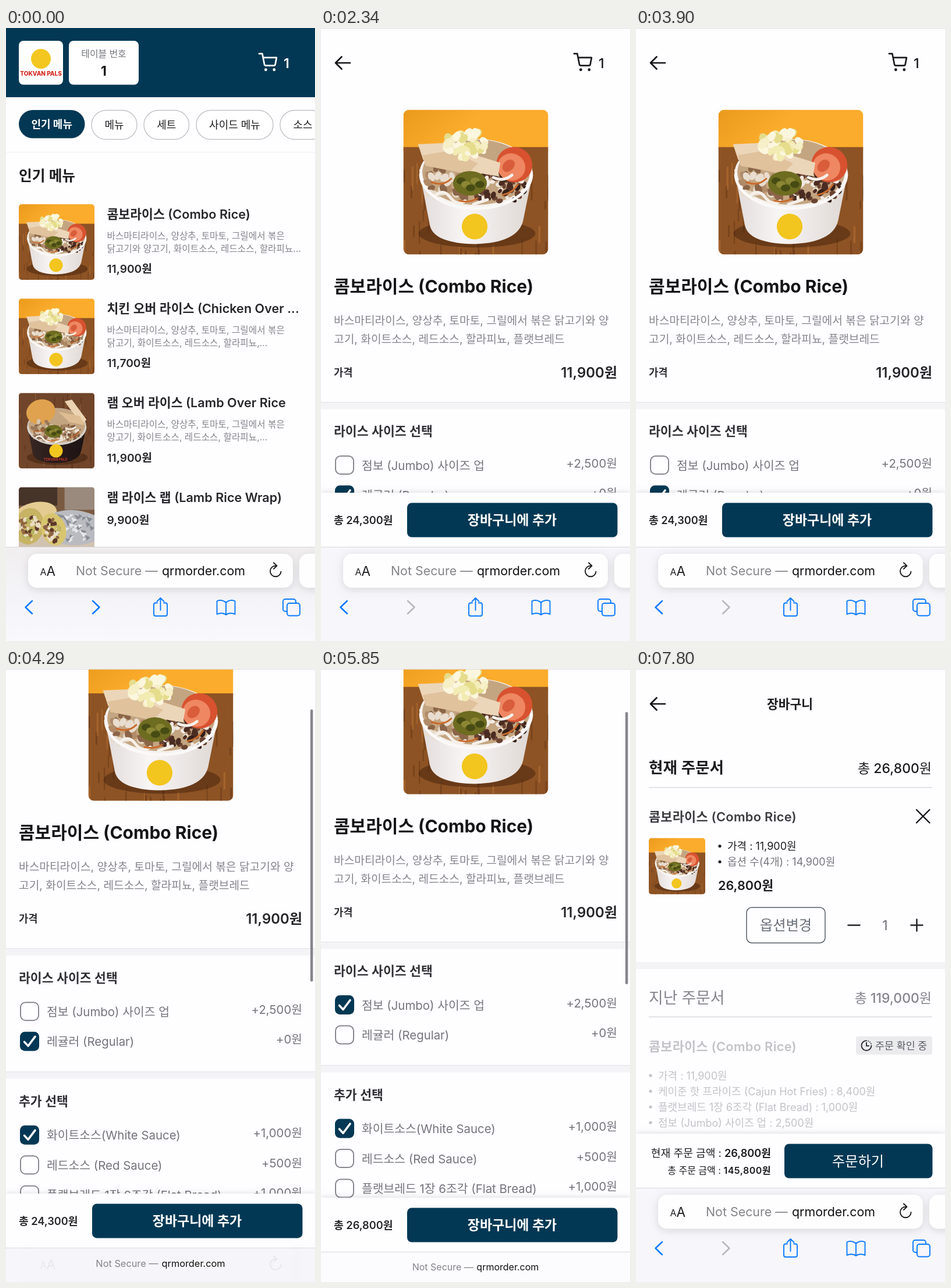
Animation of 531x1054 px, one loop 7930 ms. Source, as an HTML page with a canvas:

```html
<!DOCTYPE html>
<html lang="ko">
<head>
<meta charset="utf-8">
<title>Table order</title>
<style>
html, body { margin: 0; width: 100%; height: 100%; overflow: hidden; background: #fefdff; }
canvas { display: block; width: 531px; height: 1054px; }
</style>
</head>
<body>
<canvas id="stage"></canvas>
<script>
const W = 531, H = 1054, LOOP = 7930, STEP = 130;
const NAVY = '#023854', PAGE = '#fefdff', INK = '#1d1d20', GREY = '#85858d', PALE = '#c3c3c8', BLUE = '#0a7aff';
const FAMILY = 'Inter, "Noto Sans CJK KR", "Noto Sans CJK", sans-serif';
const BRAND = 'TOKVAN PALS';
const canvas = document.getElementById('stage');
const ctx = canvas.getContext('2d');
const dpr = window.devicePixelRatio || 1;
canvas.width = W * dpr;
canvas.height = H * dpr;

const clamp = v => Math.max(0, Math.min(1, v));
const lerp = (a, b, p) => a + (b - a) * p;
const easeOut = p => 1 - Math.pow(1 - p, 3);

function seeded(n) {
  return () => (n = (n * 16807) % 2147483647) / 2147483647;
}

// cy is the optical middle of the line
function text(str, x, cy, size, weight, color, align = 'left', spacing = 0) {
  ctx.font = `${weight} ${size}px ${FAMILY}`;
  ctx.letterSpacing = spacing + 'px';
  ctx.textAlign = align;
  ctx.fillStyle = color;
  ctx.fillText(str, x, cy + size * 0.37);
  return ctx.measureText(str).width;
}

function rect(x, y, w, h, color) {
  ctx.fillStyle = color;
  ctx.fillRect(x, y, w, h);
}

function box(x, y, w, h, r, fill, line, width = 1.4) {
  ctx.beginPath();
  ctx.roundRect(x, y, w, h, r);
  if (fill) { ctx.fillStyle = fill; ctx.fill(); }
  if (line) { ctx.strokeStyle = line; ctx.lineWidth = width; ctx.stroke(); }
}

function disc(x, y, rx, color, ry = rx, turn = 0) {
  ctx.beginPath();
  ctx.ellipse(x, y, rx, ry, turn, 0, Math.PI * 2);
  ctx.fillStyle = color;
  ctx.fill();
}

function shape(d, color) {
  ctx.fillStyle = color;
  ctx.fill(new Path2D(d));
}

function line(d, color, width, cap = 'round') {
  ctx.strokeStyle = color;
  ctx.lineWidth = width;
  ctx.lineCap = cap;
  ctx.lineJoin = 'round';
  ctx.stroke(new Path2D(d));
}

function shadowed(color, blur, dy, draw) {
  ctx.save();
  ctx.shadowColor = color;
  ctx.shadowBlur = blur * dpr;
  ctx.shadowOffsetY = dy * dpr;
  draw();
  ctx.restore();
}

/* ---------- photos, drawn in a 248 unit square ---------- */

function scatter(rnd, n, cx, cy, rx, ry, size, colors) {
  for (let i = 0; i < n; i++) {
    const a = rnd() * Math.PI * 2, d = Math.sqrt(rnd());
    const r = size * (0.5 + rnd() * 0.6);
    disc(cx + Math.cos(a) * d * rx, cy + Math.sin(a) * d * ry, r,
      colors[Math.floor(rnd() * colors.length)], r * 0.7, rnd() * 3);
  }
}

function wood(rnd, top, color) {
  rect(0, top, 248, 248 - top, color);
  for (let i = 0; i < 70; i++) {
    const x = rnd() * 248, y = top + rnd() * (248 - top);
    rect(x, y, 1.5 + rnd() * 2, 12 + rnd() * 36, i % 3 ? 'rgba(62,28,8,.28)' : 'rgba(214,140,66,.3)');
  }
}

function bowl(kind) {
  const rnd = seeded(kind === 'lamb' ? 91 : 37);
  const lamb = kind === 'lamb', combo = kind === 'combo';
  if (lamb) {
    wood(rnd, 0, '#70452a');
  } else {
    const g = ctx.createLinearGradient(0, 0, 60, 70);
    g.addColorStop(0, '#eb9a1c');
    g.addColorStop(1, '#fbac2c');
    rect(0, 0, 248, 70, g);
    wood(rnd, 64, '#8d5324');
  }
  disc(126, 212, 100, 'rgba(50,22,6,.4)', 24);
  const body = ctx.createLinearGradient(28, 0, 220, 0);
  body.addColorStop(0, lamb ? '#3a2825' : '#e2dcda');
  body.addColorStop(0.4, lamb ? '#2a1c1b' : '#f8f5f5');
  body.addColorStop(1, lamb ? '#1d1313' : '#dfd8d4');
  shape('M27 102 L45 196 Q50 229 123 230 Q196 228 205 190 L222 106 Z', body);
  disc(124.5, 110, 97, lamb ? '#cfc4b8' : '#f5f1ee', 60);
  disc(124.5, 107, 92, '#c4a581', 56);
  if (lamb) disc(72, 62, 48, '#e0a24e', 40, -0.3);
  scatter(rnd, 70, 82, 124, 48, 32, 8, lamb ? ['#7d5b42', '#9a7858', '#d7c5ae'] : ['#b18b68', '#8b6547', '#e8ddcf']);
  scatter(rnd, 75, 162, 132, 48, 28, 7, combo ? ['#4a2c22', '#6a4332', '#342019', '#f1e9e1'] : ['#a78360', '#7c583c', '#ede3d7']);
  if (!lamb) {
    disc(190, 94, 31, '#d85230', 30, 0.5);
    disc(185, 98, 24, '#ee8762', 23, 0.5);
    disc(180, 96, 9, '#d95d3b', 12, 0.8);
    shape('M25 59 L72 57 L112 74 L166 91 L162 114 L104 104 L34 86 Z', '#ecd6b9');
    shape('M33 78 L80 70 L128 92 L110 110 L38 96 Z', '#e0c29d');
    scatter(rnd, 45, 108, 60, 34, 23, 10, ['#f2ebb2', '#e5dd8c', '#fbf6dd', '#f6efc7']);
  } else {
    shape('M150 28 L174 22 L222 88 L206 104 Z', '#ecd3b2');
    shape('M130 62 L200 76 L218 106 L166 96 Z', '#dfbd94');
  }
  disc(114, 126, 29, '#6d6c20', 21);
  for (let i = 0; i < 5; i++) disc(99 + i * 8, 122 + (i % 3) * 6, 8, i % 2 ? '#8b8735' : '#474b14', 6);
  line('M54 148 q14 -14 26 2 t26 6 M120 162 l24 -8 M154 116 q18 8 32 -4', '#f6f0ea', 5);
  line('M48 124 q20 8 34 -6 M96 156 q18 4 30 -4 M170 146 q18 -4 26 -18', '#c96a2c', 3);
  ctx.beginPath();
  ctx.ellipse(124.5, 110, 95, 59, 0, 0.02, Math.PI - 0.02);
  ctx.lineWidth = 5;
  ctx.strokeStyle = lamb ? '#d9d2cb' : '#fbf9f8';
  ctx.stroke();
  disc(122, lamb ? 190 : 200, 22, '#f2c51f');
  if (lamb) text(BRAND, 120, 218, 11, 700, '#c8372c', 'center');
}

function wrap() {
  const rnd = seeded(53);
  rect(0, 0, 248, 248, '#7a5a41');
  rect(0, 0, 126, 60, '#463429');
  rect(150, 0, 98, 74, '#9a8a7d');
  shape('M0 130 L248 110 V248 H0 Z', '#d2c3b0');
  disc(52, 92, 74, '#e3cb92', 42, -0.25);
  disc(34, 128, 48, '#c7b364', 60, 0.2);
  scatter(rnd, 50, 34, 132, 34, 42, 9, ['#5f3b2a', '#e9dcc2', '#94693f', '#b4b25c']);
  shape('M116 84 Q180 62 248 92 V178 Q190 200 126 182 Z', '#b9bbc0');
  for (let i = 0; i < 38; i++) {
    const x = 122 + rnd() * 110, y = 84 + rnd() * 86;
    shape(`M${x} ${y} l${8 + rnd() * 16} ${rnd() * 10} l-12 10 z`, i % 2 ? '#e6e8eb' : '#888c94');
  }
  disc(114, 138, 40, '#d8c56f', 54, -0.3);
  scatter(rnd, 50, 111, 142, 28, 38, 9, ['#5c3829', '#eadfca', '#8d6444', '#c6b766']);
}

function photo(kind, x, y, size, r) {
  ctx.save();
  ctx.beginPath();
  ctx.roundRect(x, y, size, size, r);
  ctx.clip();
  ctx.translate(x, y);
  ctx.scale(size / 248, size / 248);
  if (kind === 'wrap') wrap(); else bowl(kind);
  ctx.restore();
}

/* ---------- shared parts ---------- */

function cartIcon(color, weight) {
  ctx.save();
  ctx.translate(433.6, 42.8);
  ctx.scale(1.362, 1.362);
  line('M1 1h4l2.68 13.39a2 2 0 0 0 2 1.61h9.72a2 2 0 0 0 2-1.61L23 6H6', color, 2);
  disc(9.4, 21.3, 1.8, color);
  disc(20, 21.3, 1.8, color);
  ctx.restore();
  text('1', 482, 60.5, 23.5, weight, color, 'center');
}

const backArrow = () => line('M50 60 H25 M35.5 49.5 L25 60 L35.5 70.5', '#141416', 2.7);

function band(y) {
  rect(0, y, W, 12.5, '#f4f3f6');
  rect(0, y, W, 1, '#e3e2e6');
}

function footer(y) {
  shadowed('rgba(0,0,0,.13)', 9, -1, () => rect(0, y, W, 93, PAGE));
  rect(0, y, W, 93, PAGE);
}

// p: 0 = full toolbar, 1 = collapsed to the small address line
function toolbar(p, bg, field, next, shade = 0.13) {
  const top = 892 + 110 * p;
  rect(0, top, W, H - top, bg);
  rect(0, top, W, 1, '#d9d8dc');
  ctx.save();
  ctx.globalAlpha = 1 - p;
  ctx.translate(0, 96 * p);
  shadowed(`rgba(0,0,0,${shade})`, 14, 3, () => {
    box(38, 904, 455, 58.5, 15, field);
    box(504, 904, 80, 58.5, 15, field);
  });
  text('A', 58.5, 935.2, 16, 400, INK);
  text('A', 69.5, 933.5, 22.5, 400, INK);
  ctx.beginPath();
  ctx.arc(463.3, 934, 9.3, 0, Math.PI * 1.53);
  ctx.strokeStyle = INK;
  ctx.lineWidth = 1.9;
  ctx.stroke();
  line('M460 919.5 L465.5 924.8 L460 930', INK, 1.9);
  line('M45 985 L33.5 996 L45 1007', BLUE, 2.5);
  line('M149 985 L160.5 996 L149 1007', next, 2.5);
  line('M260 988.5 H257 a3 3 0 0 0 -3 3 V1008 a3 3 0 0 0 3 3 H274 a3 3 0 0 0 3 -3 V991.5 a3 3 0 0 0 -3 -3 H271 M265.5 1001 V980 M259.5 986 L265.5 980 L271.5 986', BLUE, 1.9);
  line('M378 988 C374 983.5 366 983 362.5 985.5 V1008 C367 1005.5 374 1005.5 378 1009 C382 1005.5 389 1005.5 393.5 1008 V985.5 C390 983 382 983.5 378 988 V1009', BLUE, 1.9);
  line('M483 1003 H480 a4 4 0 0 1 -4 -4 V986 a4 4 0 0 1 4 -4 H494 a4 4 0 0 1 4 4 V989', BLUE, 1.9);
  box(483, 989, 22, 21.5, 4, null, BLUE, 1.9);
  ctx.restore();
  const size = lerp(21.4, 16, p), half = 145.5 * size / 21.4, y = lerp(933.5, 1028, p);
  text('Not Secure —', 265.5 - half, y, size, 400, '#858489');
  text('qrmorder.com', 265.5 + half, y, size, 400, '#111113', 'right');
}

const lightBar = (p = 0) => toolbar(p, p === 1 ? '#fcfbfe' : '#f7f6fa', '#fefeff', '#b7b6bb');

/* ---------- screens ---------- */

const chips = [['메뉴', 147, 78], ['세트', 237, 77.5], ['사이드 메뉴', 327, 132], ['소스', 471, 78]];
const SAUCES = '화이트소스, 레드소스, 할라피뇨';
const dishes = [
  ['combo', '콤보라이스 (Combo Rice)', '닭고기와 양고기, ' + SAUCES + '...', '11,900원'],
  ['chicken', '치킨 오버 라이스 (Chicken Over ...', '닭고기, ' + SAUCES + ',...', '11,700원'],
  ['lamb', '램 오버 라이스 (Lamb Over Rice', '양고기, ' + SAUCES + ',...', '11,900원'],
  ['wrap', '램 라이스 랩 (Lamb Rice Wrap)', '', '9,900원']
];

function menu() {
  rect(0, 0, W, 119, NAVY);
  box(22, 22, 76, 75.5, 8, '#fff');
  disc(60, 53, 17, '#f3c71f');
  text(BRAND, 60, 78, 10, 800, '#d5281f', 'center');
  box(108, 22, 120, 75.5, 8, '#fff');
  text('테이블 번호', 168, 44, 15.9, 500, '#74767d', 'center');
  text('1', 168, 73.5, 23, 700, '#141416', 'center');
  cartIcon('#fff', 600);

  box(22, 141, 113.5, 48.5, 24.25, NAVY);
  text('인기 메뉴', 78.7, 165.5, 18, 700, '#fff', 'center');
  for (const [label, x, w] of chips) {
    box(x, 141.5, w, 50, 25, '#fff', '#c3c3c7');
    text(label, x + w / 2, 166.5, 18, 400, INK, 'center');
  }
  rect(0, 213, W, 1, '#f0eff3');
  text('인기 메뉴', 22, 254, 24.7, 600, INK);

  dishes.forEach(([kind, name, more, price], i) => {
    const y = 303 + 162.2 * i;
    photo(kind, 22, y, 130, 5);
    text(name, 173.5, y + 17, 21.6, 600, '#27272b');
    if (more) {
      text('바스마티라이스, 양상추, 토마토, 그릴에서 볶은', 173.5, y + 54, 15.7, 400, GREY);
      text(more, 173.5, y + 76, 15.7, 400, GREY);
    }
    text(price, 173.5, y + (more ? 111 : 56), 19.2, 600, '#27272b');
  });
  const g = ctx.createLinearGradient(0, 892, 0, 1054);
  g.addColorStop(0, '#f1eeef');
  g.addColorStop(0.6, '#f5f5f9');
  g.addColorStop(1, '#f9f8fb');
  toolbar(0, g, '#fefeff', BLUE);
}

function blank(dim) {
  rect(0, 0, W, H, '#f5f4f8');
  rect(0, 0, W, 1, '#d4d3d8');
  const mix = (a, b) => 'rgb(' + a.map((v, i) => Math.round(lerp(v, b[i], dim))).join() + ')';
  toolbar(0, mix([247, 246, 250], [179, 174, 178]), mix([254, 254, 255], [240, 238, 242]),
    mix([183, 182, 187], [144, 141, 146]), 0.1);
}

function option(cy, label, price, on) {
  ctx.save();
  ctx.globalAlpha = 1 - on;
  box(25, cy - 15.5, 31, 31, 8.5, PAGE, '#88868e', 2);
  ctx.globalAlpha = on;
  box(24, cy - 16.5, 33, 33, 8.5, NAVY);
  line(`M31.5 ${cy + 1} L38 ${cy + 8} L50 ${cy - 8}`, '#fff', 3.6);
  ctx.restore();
  text(label, 70, cy + 0.5, 20.4, 400, '#74747c');
  text(price, 509, cy - 3.5, 20.4, 400, '#74747c', 'right');
}

function detail(t) {
  const p = easeOut(clamp((t - 3900) / 650));
  const jumbo = clamp((t - 5590) / 200);
  const regular = 1 - clamp((t - 5010) / 200);
  ctx.save();
  ctx.translate(0, -174 * p);
  backArrow();
  cartIcon('#1c1c1f', 500);
  photo('combo', 141.5, 140.5, 249, 10);
  text('콤보라이스 (Combo Rice)', 22, 444, 30, 700, '#151518');
  text('바스마티라이스, 양상추, 토마토, 그릴에서 볶은 닭고기와 양', 22, 502.5, 19.2, 400, GREY);
  text('고기, ' + SAUCES + ', 플랫브레드', 22, 535, 19.2, 400, GREY);
  text('가격', 22, 592, 17.7, 600, '#303035');
  text('11,900원', 509, 592, 24, 600, '#27272b', 'right');
  band(643);
  text('라이스 사이즈 선택', 22, 693.5, 21.6, 600, '#303035');
  option(751.5, '점보 (Jumbo) 사이즈 업', '+2,500원', jumbo);
  option(803, '레귤러 (Regular)', '+0원', regular);
  band(855);
  text('추가 선택', 22, 906, 21.6, 600, '#303035');
  option(964, '화이트소스(White Sauce)', '+1,000원', 1);
  option(1015.5, '레드소스 (Red Sauce)', '+500원', 0);
  option(1067, '플랫브레드 1장 6조각 (Flat Bread)', '+1,000원', 0);
  ctx.restore();
  rect(0, 0, W, 1, '#dedde2');
  if (p > 0) box(523, lerp(4, 74, p), 4.5, 468, 2.2, '#87868b');

  const y = 799 + 110 * p;
  footer(y);
  text(t < 5720 ? '총 24,300원' : '총 26,800원', 22, y + 47, 18.2, 600, '#27272b');
  box(148, y + 17.5, 361.5, 59, 8, NAVY);
  text('장바구니에 추가', 328.5, y + 46.5, 23, 700, '#fff', 'center');
  lightBar(p);
}

function bullet(str, x, y, color, gap) {
  disc(x, y, 2.6, color);
  text(str, x + gap, y, 18, 400, color);
}

function sum(label, amount, y, size, spacing) {
  const w = text(amount, 232, y, size, 600, INK, 'right', spacing);
  text(label, 232 - w, y, size, 400, INK, 'right');
}

function basket() {
  rect(0, 0, W, 1, '#dedde2');
  backArrow();
  text('장바구니', 264.5, 60, 21.5, 600, INK, 'center');
  text('현재 주문서', 22, 169, 26.6, 600, INK);
  text('총 26,800원', 508, 170.5, 23, 500, INK, 'right');
  rect(22, 203, 487, 1.4, '#d7d6db');
  text('콤보라이스 (Combo Rice)', 22, 253.5, 21.8, 600, '#3b3b40', 'left', 0.3);
  line('M482 242 L504.5 264.5 M504.5 242 L482 264.5', '#141416', 2.4);
  photo('combo', 22, 290.5, 97, 5);
  bullet('가격 : 11,900원', 144, 304.5, INK, 13);
  disc(144, 331.5, 2.6, INK);
  text('옵션 수(4개) : 14,900원', 157, 331.5, 18, 400, '#76767d');
  text('26,800원', 141, 372, 21.6, 600, INK);
  box(190, 410, 135, 61, 9, PAGE, '#56606b', 1.5);
  text('옵션변경', 257.5, 440.5, 24.3, 500, '#6a7079', 'center');
  line('M364.5 440.5 H384.5 M472.5 440.5 H492.5 M482.5 430.5 V450.5', '#222226', 2.5);
  text('1', 428, 440.5, 23, 400, '#6e6e75', 'center');
  rect(0, 504, W, 12, '#f4f3f6');

  text('지난 주문서', 22, 565, 26.8, 500, GREY);
  text('총 119,000원', 508, 565.5, 23, 500, GREY, 'right');
  rect(22, 597.5, 487, 1.4, '#d7d6db');
  text('콤보라이스 (Combo Rice)', 22, 648.5, 21.8, 600, PALE, 'left', 0.3);
  box(378, 631.5, 131, 31.5, 4, '#ebebee');
  line('M396 639 A8.5 8.5 0 1 0 404.5 647.5 M396 642.5 V648 H400', '#34363b', 2);
  for (let i = 1; i < 4; i++) {
    const a = -Math.PI / 2 + i * Math.PI / 8;
    disc(396 + 8.5 * Math.cos(a), 647.5 + 8.5 * Math.sin(a), 1, '#34363b');
  }
  text('주문 확인 중', 411, 647.5, 17.4, 500, '#5b5e65');
  const lines = ['가격 : 11,900원', '케이준 핫 프라이즈 (Cajun Hot Fries) : 8,400원',
    '플랫브레드 1장 6조각 (Flat Bread) : 1,000원', '점보 (Jumbo) 사이즈 업 : 2,500원'];
  lines.forEach((s, i) => bullet(s, 25, 699 + 27 * i, PALE, 13));

  footer(799);
  sum('현재 주문 금액 : ', '26,800원', 832.5, 18.2, 0);
  sum('총 주문 금액 : ', '145,800원', 862, 16, 0.5);
  box(255, 816.5, 254.5, 59, 8, NAVY);
  text('주문하기', 381.5, 846, 24.2, 500, '#fff', 'center');
  lightBar();
}

function draw(t) {
  ctx.setTransform(dpr, 0, 0, dpr, 0, 0);
  rect(0, 0, W, H, PAGE);
  if (t < 1040) menu();
  else if (t < 2080) blank(1 - clamp((t - 1300) / 400));
  else if (t < 6760) detail(t);
  else if (t < 7020) blank(0);
  else basket();
}

const start = performance.now();
function tick() {
  const t = (performance.now() - start) % LOOP;
  draw(Math.floor(t / STEP) * STEP);
  requestAnimationFrame(tick);
}
tick();
</script>
</body>
</html>
```
